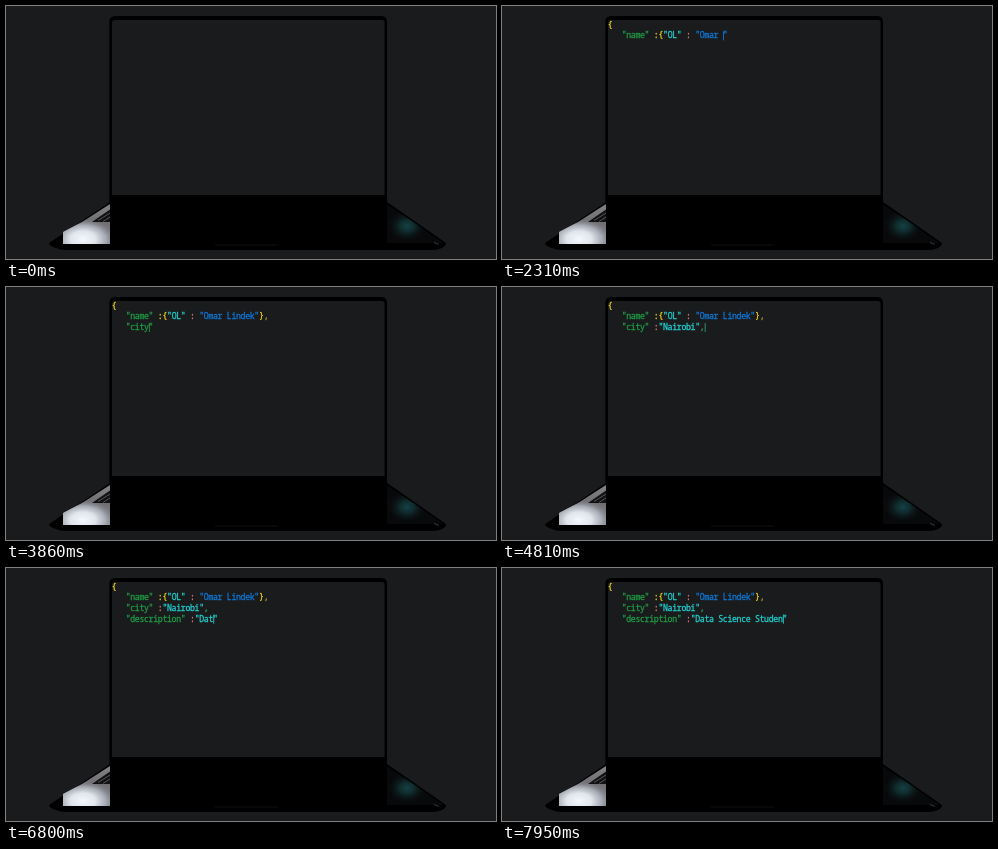
An HTML page for the animation above (8000 ms loop, 490 px wide and 253 px high).

```html
<!DOCTYPE html>
<html lang="en">
<head>
<meta charset="utf-8">
<title>Typing profile</title>
<style>
  html, body { margin: 0; width: 100%; height: 100%; overflow: hidden; background: #1a1b1d; }
  svg { display: block; width: 490px; height: 253px; }
  text {
    font: 500 8.2px "Noto Sans Mono", "DejaVu Sans Mono", monospace;
    letter-spacing: -.32px; white-space: pre; stroke-width: .28px;
  }
</style>
</head>
<body>
<svg viewBox="0 0 490 253" xmlns="http://www.w3.org/2000/svg">
  <defs>
    <linearGradient id="deck" x1="0" y1="0" x2="0" y2="1">
      <stop offset="0" stop-color="#858286"/>
      <stop offset=".45" stop-color="#6f6e73"/>
      <stop offset="1" stop-color="#85888f"/>
    </linearGradient>
    <radialGradient id="shine">
      <stop offset="0" stop-color="#f4f7fb"/>
      <stop offset=".4" stop-color="#e0e5ed"/>
      <stop offset=".7" stop-color="#b3b8c2" stop-opacity=".8"/>
      <stop offset="1" stop-color="#85888f" stop-opacity="0"/>
    </radialGradient>
    <radialGradient id="teal">
      <stop offset="0" stop-color="#154042"/>
      <stop offset=".35" stop-color="#102c2f"/>
      <stop offset="1" stop-color="#0b0c0e" stop-opacity="0"/>
    </radialGradient>
    <clipPath id="left"><path d="M104 198 L76 216 L57 226 V238 H104Z"/></clipPath>
    <clipPath id="right"><path d="M381 198 L438 237 H381Z"/></clipPath>
  </defs>
  <rect width="490" height="253" fill="#1a1b1d"/>

  <path d="M104 196 L43 237 Q43 240 50 242 Q54 244 60 244 H426 Q432 244 436 242 Q440 240 440 237 L381 196Z"/>
  <path d="M103.4 200 V16 Q103.4 10 109 10 H375.4 Q381 10 381 16 V200Z"/>
  <path d="M106 189 V17 Q106 14 109 14 H375.6 Q378.6 14 378.6 17 V189Z" fill="#1a1b1d"/>

  <g clip-path="url(#left)">
    <rect x="57" y="198" width="47" height="40" fill="url(#deck)"/>
    <ellipse cx="77" cy="233" rx="32" ry="20" fill="url(#shine)"/>
    <path d="M104 203.5 L86 216 H104Z" fill="#111112"/>
    <path d="M104 207 L92 214.5 M104 211 L97 215.5" stroke="#68676b" stroke-width=".8"/>
  </g>
  <g clip-path="url(#right)">
    <path d="M381 198 L438 237 H381Z" fill="#08090a"/>
    <ellipse cx="401" cy="220" rx="20" ry="16" fill="url(#teal)"/>
  </g>
  <path d="M428 236.5 L433 238.5" stroke="#444649" stroke-width=".8"/>
  <path d="M209 239 H272" stroke="#161617" stroke-width=".8"/>

  <g id="code"></g>
  <rect id="caret" width=".9" height="9"/>
</svg>
<script>
const LOOP = 8000, LEFT = 106, TOP = 21.7, CHAR = 4.6, LINE = 10.65, INDENT = 3;
const YELLOW = '#f2d813', GREEN = '#1f9c45', CYAN = '#1ed0cf', BLUE = '#0d78d8', PINK = '#e88080';

// Lines of [text, colour, closes its quote while being typed]
const lines = [
  [['{', YELLOW]],
  [['"name"', GREEN, 1], [' :{', YELLOW], ['"OL"', CYAN, 1], [' : ', PINK],
   ['"Omar Lindek"', BLUE, 1], ['}', YELLOW], [',', '#a39c3c']],
  [['"city"', GREEN, 1], [' :', PINK], ['"Nairobi"', CYAN, 1], [',', '#369a72']],
  [['"description"', GREEN], [' :', PINK], ['"Data Science Student"', CYAN, 1]]
];

// Runs of evenly spaced steps: [first ms, last ms, count]
const runs = [
  [100, 890, 10], [970, 1060, 2], [1240, 2040, 10], [2130, 2130, 1], [2310, 3070, 10],
  [3160, 3500, 5], [3700, 3860, 3], [3950, 4460, 7], [4550, 4810, 4], [4910, 5090, 3],
  [5270, 5770, 7], [5960, 6220, 4], [6420, 6800, 5], [6900, 7200, 4], [7290, 7950, 9]
];
const steps = runs.flatMap(([a, b, n]) =>
  Array.from({ length: n }, (_, i) => n > 1 ? a + (b - a) * i / (n - 1) : a));

// Steps passed -> characters typed
const pace = [[0, 0], [24, 24], [41, 39], [52, 52], [63, 64], [71, 72], [84, 88]];

function typedAt(ms) {
  const s = steps.filter(t => t <= ms + 0.01).length;
  const k = Math.max(1, pace.findIndex(p => p[0] >= s));
  const [s0, c0] = pace[k - 1], [s1, c1] = pace[k];
  return Math.round(c0 + (c1 - c0) * (s - s0) / (s1 - s0));
}

const code = document.getElementById('code');
const caret = document.getElementById('caret');
const tokens = [];
let pos = 0;
lines.forEach((line, row) => {
  let col = row ? INDENT : 0;
  for (const [text, color, closes] of line) {
    const el = document.createElementNS('http://www.w3.org/2000/svg', 'text');
    // Leading spaces become an offset
    const pad = text.length - text.trimStart().length;
    el.setAttribute('x', LEFT + (col + pad) * CHAR - 0.15);
    el.setAttribute('y', TOP + row * LINE);
    el.setAttribute('fill', color);
    el.setAttribute('stroke', color);
    code.append(el);
    tokens.push({ el, text, color, closes, pad, col, row, start: pos });
    col += text.length;
    pos += text.length;
  }
  pos++;
});

function draw(ms) {
  const n = typedAt(ms);
  let x = 0, row = 0, color = 'none';
  for (const t of tokens) {
    const shown = Math.max(0, Math.min(t.text.length, n - t.start));
    const open = t.closes && shown > 0 && shown < t.text.length;
    t.el.textContent = t.text.slice(t.pad, Math.max(t.pad, shown)) + (open ? '"' : '');
    const newLine = t.row !== row && n >= t.start;
    if (shown || newLine) {
      x = t.col + shown;
      row = t.row;
      color = t.color;
    }
  }
  caret.setAttribute('x', LEFT + x * CHAR + 0.1);
  caret.setAttribute('y', TOP + row * LINE - 7);
  caret.setAttribute('fill', color);
}

const begin = performance.now();
function frame() {
  draw((performance.now() - begin) % LOOP);
  requestAnimationFrame(frame);
}
draw(0);
requestAnimationFrame(frame);
</script>
</body>
</html>
```
